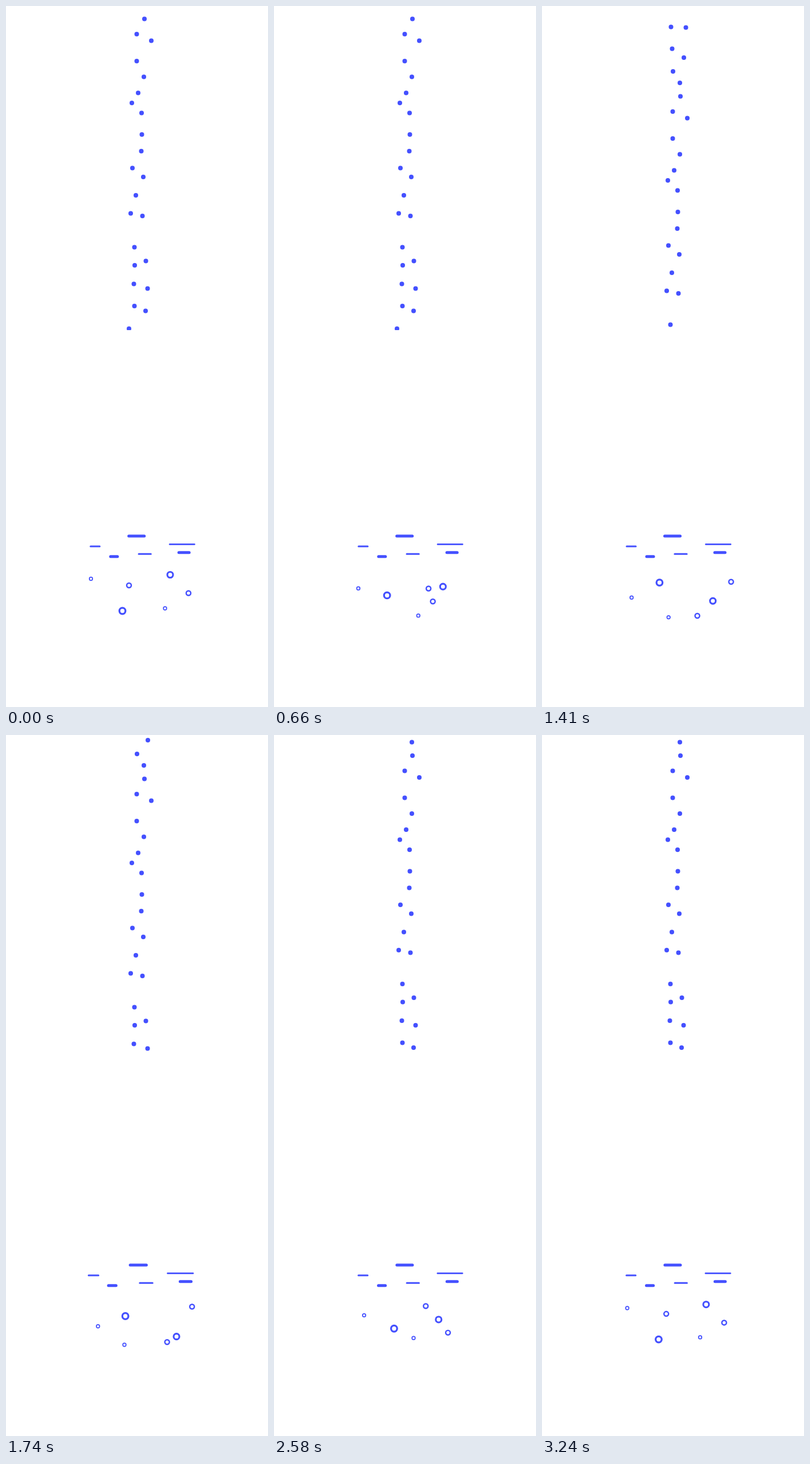
An HTML page with a canvas that plays this animation: 458x1222 px, repeating every 3270 ms.

```html
<!DOCTYPE html>
<html lang="en">
<head>
<meta charset="utf-8">
<title>Rising drops</title>
<style>
  html, body { margin: 0; width: 100%; height: 100%; overflow: hidden; background: #fff; }
  canvas { display: block; }
</style>
</head>
<body>
<canvas id="stage" width="458" height="1222"></canvas>
<script>
const ctx = document.getElementById('stage').getContext('2d');
const BLUE = '#4450ff', STEP = 30, FRAMES = 109, LOOP = STEP * FRAMES;
const POSES = 11, MID = 6, CLIMB = 13.5;

// Drops at the middle pose; all of them climb by the same amount per pose
const drops = [
  [225.5, -31], [251.5, -30], [227.5, 7], [248, 22.5], [229, 46.5], [241, 66.5],
  [242, 90], [228.5, 116.5], [254, 128], [228.5, 163.5], [241, 191], [231, 219],
  [220, 236.5], [237, 254], [237.5, 291.5], [236.5, 320.5], [221, 350], [240, 365.5],
  [227, 397.5], [218, 429], [238.5, 433.5], [224.5, 488], [244.5, 512], [225, 519.5],
  [223.5, 552], [247.5, 560], [224.5, 590.5], [244, 599], [215, 630]
];

// Ripples swing sideways by "swing" and back
const ripples = [
  { x: 228, y: 924, len: 32, w: 5, swing: 13 },
  { x: 156, y: 942, len: 19, w: 3, swing: -12 },
  { x: 189, y: 959.7, len: 17, w: 5, swing: -13 },
  { x: 242.5, y: 955.2, len: 24, w: 3, swing: 10 },
  { x: 311, y: 952.7, len: 23, w: 5, swing: 12 },
  { x: 308, y: 938.4, len: 46, w: 2.8, swing: -13 }
];

// Bubbles run from a to b along one arc and return along another, bent by the points out and back
const bubbles = [
  { r: 5, turn: 1750, a: [287, 991.5], out: [301.5, 1018], b: [298, 1049], back: [284, 1023] },
  { r: 5.3, turn: 1230, a: [203.5, 1054.5], out: [192, 1031], b: [203, 1001], back: [218, 1024] },
  { r: 2.8, turn: 1590, a: [148.5, 998.5], out: [142, 1020], b: [160.5, 1034.5], back: [163, 1013] },
  { r: 4, turn: 1530, a: [215, 1010], out: [280, 1025], b: [340, 1000], back: [279, 983] },
  { r: 4, turn: 1090, a: [319, 1023.5], out: [277, 1021], b: [261, 1066.5], back: [298, 1056] },
  { r: 2.8, turn: 1740, a: [278, 1050], out: [245, 1073], b: [207, 1063], back: [238.5, 1047] }
];

const arcPoint = (p, c, q, u) =>
  p.map((v, k) => (1 - u) ** 2 * v + 2 * u * (1 - u) * c[k] + u * u * q[k]);

function circle(x, y, r) {
  ctx.beginPath();
  ctx.arc(x, y, r, 0, Math.PI * 2);
}

function drawDrops(pose) {
  ctx.save();
  ctx.beginPath();
  ctx.rect(0, 0, 458, 565);
  ctx.clip();
  for (const [x, midY] of drops) {
    const y = midY - (pose - MID) * CLIMB;
    if (y < 5) continue;
    circle(x, y, 4);
    ctx.fill();
  }
  ctx.restore();
}

function drawRipples(pose) {
  // Eases out to the far side, then falls back quickly
  const shift = pose < 5 ? Math.sin((pose - 1) * Math.PI / 8) : 0.5 ** (pose - 5);
  const stretch = 6 / (1 + 4 * (pose - MID) ** 2);
  for (const { x, y, len, w, swing } of ripples) {
    const cx = x + swing * shift, half = (len + stretch - w) / 2;
    ctx.lineWidth = w;
    ctx.beginPath();
    ctx.moveTo(cx - half, y);
    ctx.lineTo(cx + half, y);
    ctx.stroke();
  }
}

function drawBubbles(t) {
  for (const { r, turn, a, out, b, back } of bubbles) {
    const [x, y] = t < turn
      ? arcPoint(a, out, b, t / turn)
      : arcPoint(b, back, a, (t - turn) / (LOOP - turn));
    ctx.lineWidth = r * 0.62;
    circle(x, y, r);
    ctx.stroke();
  }
}

function draw(now) {
  const frame = Math.floor(now / STEP) % FRAMES;
  const pose = Math.floor(frame / 2) % POSES || POSES; // each pose is held for two steps
  ctx.fillStyle = '#fff';
  ctx.fillRect(0, 0, 458, 1222);
  ctx.fillStyle = ctx.strokeStyle = BLUE;
  ctx.lineCap = 'round';
  drawDrops(pose);
  drawRipples(pose);
  drawBubbles(frame * STEP);
}

let start;
function tick(now) {
  start ??= now;
  draw(Math.max(0, now - start));
  requestAnimationFrame(tick);
}
draw(0);
requestAnimationFrame(tick);
</script>
</body>
</html>
```
